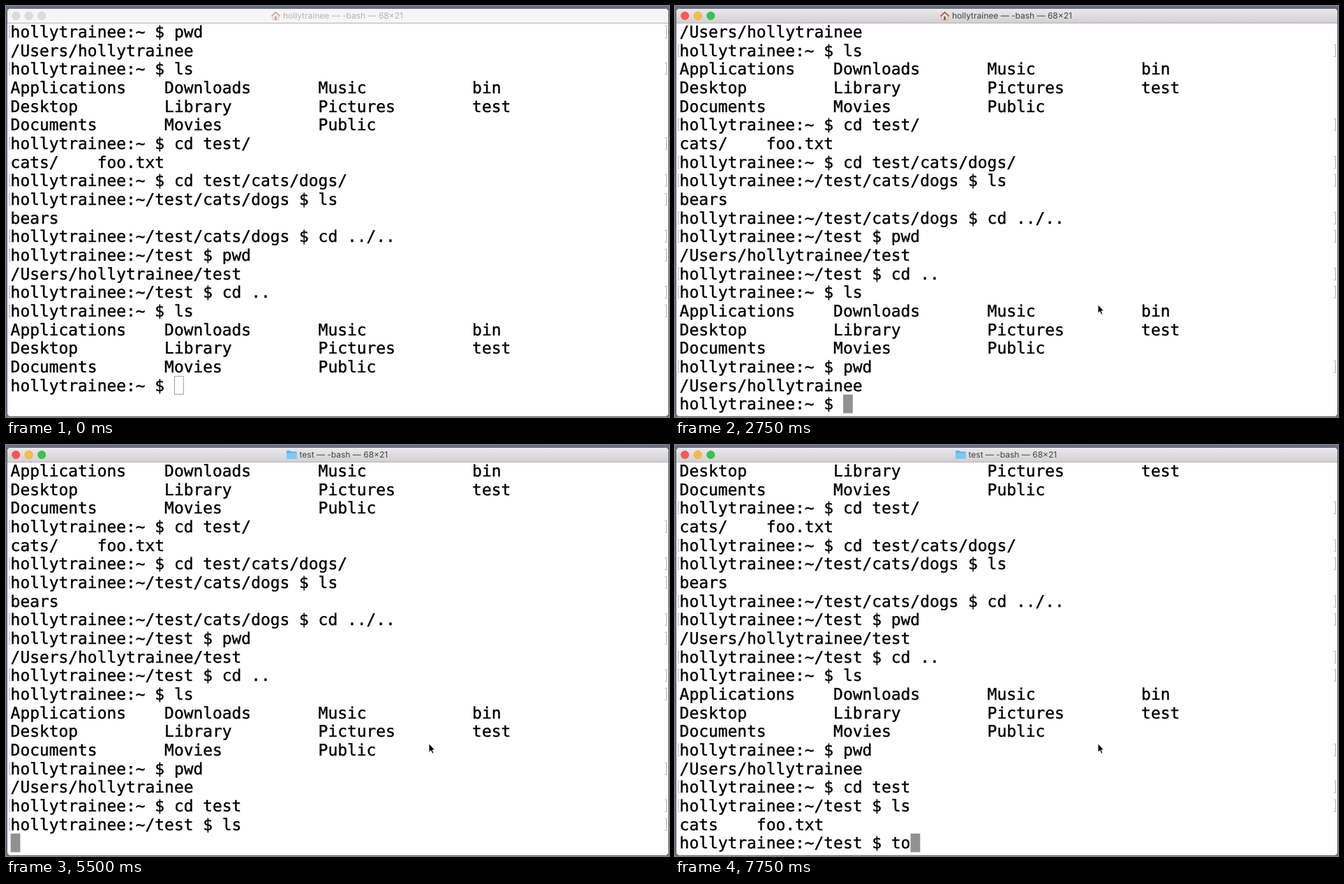
These frames come from a looping animation (950x589 px, 8000 ms). An HTML page:

```html
<!DOCTYPE html>
<html lang="en">
<head>
<meta charset="utf-8">
<title>Terminal</title>
<style>
  html, body { margin: 0; width: 100%; height: 100%; overflow: hidden; background: #667085; }
  svg { display: block; width: 950px; height: 589px; }
  text { white-space: pre; text-rendering: geometricPrecision; }
  #rows text { font: 22.9px "DejaVu Sans Mono", monospace; fill: #000; stroke: #000; stroke-width: .4px; }
  #rows path { fill: none; stroke: #b4b4b4; }
  #caption { font: 12px Inter, "Open Sans", sans-serif; fill: #444; }
  #bar { fill: url(#chrome); }
  #block { fill: #919191; }
  .idle #bar { fill: #f6f6f6; }
  .idle #lights circle { fill: #dcdcdc; stroke: #c9c9c9; }
  .idle #caption { fill: #b2b2b2; }
  .idle #icons { opacity: .5; }
  .idle #block { fill: #fff; stroke: #9c9c9c; }
</style>
</head>
<body>
<svg id="stage" viewBox="0 0 950 589">
  <defs>
    <linearGradient id="chrome" x2="0" y2="1">
      <stop stop-color="#ebe9eb"/>
      <stop offset="1" stop-color="#d2d0d2"/>
    </linearGradient>
  </defs>
  <rect width="950" height="589" fill="#667085"/>
  <rect x="1.5" y="3.5" width="948" height="585" rx="5" fill="#fff" stroke="#596273"/>
  <path id="bar" d="M2 24V9Q2 4 7 4H944Q949 4 949 9V24Z"/>
  <path d="M2 24.5H949" stroke="#b3b1b3"/>
  <g id="lights" stroke-width=".7">
    <circle cx="14.2" cy="14" r="5.6" fill="#fc5753" stroke="#df4744"/>
    <circle cx="32.7" cy="14" r="5.6" fill="#fdbc40" stroke="#de9f34"/>
    <circle cx="51.2" cy="14" r="5.6" fill="#33c748" stroke="#27aa35"/>
  </g>
  <g id="icons">
    <g id="house">
      <path d="M382 13.5L386.5 9.5L391 13.5V20H382Z" fill="#f1e6d6" stroke="#a89883" stroke-width=".8"/>
      <path d="M380.3 14.6L386.5 8.8L392.7 14.6" fill="none" stroke="#b5553c" stroke-width="1.6"/>
      <rect x="385" y="15" width="3" height="5" fill="#8a6544"/>
    </g>
    <g id="folder">
      <path d="M402 20V9Q402 8 403 8H407L408.5 9.5H415.5Q416.5 9.5 416.5 10.5V20Z" fill="#58b4e4"/>
      <path d="M402 11.5H416.5V20H402Z" fill="#78cbf3"/>
    </g>
  </g>
  <text id="caption" y="18.3"></text>
  <rect id="block"/>
  <g id="rows"></g>
  <path id="mouse" d="M1 1V13.4L3.8 10.8L5.9 15.3L7.9 14.4L5.9 10H9.6Z" stroke="#fff" stroke-width=".9"/>
</svg>
<script>
const LOOP = 8000, ROWS = 21;
const LEFT = 6.6, TOP = 23.5, BASE = 45, CHAR = 13.787, LINE = 80 / 3;
const USER = 'hollytrainee', HOME = '/Users/' + USER;
const $ = id => document.getElementById(id);

const prompt = (dir, cmd = '') => `${USER}:${dir} $ ${cmd}`;
const columns = (...names) => names.map(n => n.padEnd(16)).join('').trimEnd();
const listing = [
  columns('Applications', 'Downloads', 'Music', 'bin'),
  columns('Desktop', 'Library', 'Pictures', 'test'),
  columns('Documents', 'Movies', 'Public')
];
const log = [
  prompt('~', 'pwd'), HOME,
  prompt('~', 'ls'), ...listing,
  prompt('~', 'cd test/'), 'cats/    foo.txt',
  prompt('~', 'cd test/cats/dogs/'),
  prompt('~/test/cats/dogs', 'ls'), 'bears',
  prompt('~/test/cats/dogs', 'cd ../..'),
  prompt('~/test', 'pwd'), HOME + '/test',
  prompt('~/test', 'cd ..'),
  prompt('~', 'ls'), ...listing,
  prompt('~', 'pwd'), HOME,
  prompt('~', 'cd test'),
  prompt('~/test', 'ls'), 'cats    foo.txt'
];

// time, finished log lines, line being typed
const typing = [
  [0, 19, prompt('~')],
  [2000, 19, prompt('~', 'p')],
  [2500, 19, prompt('~', 'pw')],
  [2750, 21, prompt('~')],
  [3750, 21, prompt('~', 'cd')],
  [4000, 21, prompt('~', 'cd t')],
  [4250, 21, prompt('~', 'cd test')],
  [4500, 22, prompt('~/test')],
  [5500, 23, ''],
  [5750, 24, prompt('~/test')],
  [7750, 24, prompt('~/test', 'to')]
];

// time, x, y
const pointer = [
  [0, -50, -50], [250, 651, 205], [500, 385, 426],
  [750, 395, 444], [1000, 602, 434], [1250, 605, 427]
];

const at = (track, t) => track.findLast(step => step[0] <= t);

function set(el, attrs) {
  for (const key in attrs) el.setAttribute(key, attrs[key]);
  return el;
}

function add(tag, attrs) {
  const el = document.createElementNS($('stage').namespaceURI, tag);
  return $('rows').appendChild(set(el, attrs));
}

function drawRow(text, row, entered) {
  const y = BASE + Math.round(row * LINE);
  add('text', { x: LEFT, y }).textContent = text;
  if (!entered) return;
  const top = y - 16.5;
  add('path', { d: `M6.5 ${top}H4.5v17h2M944 ${top}h2.5v17h-2.5` });
}

function drawScreen([, count, live], idle) {
  const first = Math.max(0, count + 1 - ROWS);
  const last = count - first;
  $('rows').replaceChildren();
  log.slice(first, count).forEach((s, i) => drawRow(s, i, s.includes(' $ ')));
  drawRow(live, last, false);

  const edge = idle ? .5 : 0;
  set($('block'), {
    x: LEFT + live.length * CHAR + edge,
    y: TOP + last * LINE + edge,
    width: CHAR - 2 * edge,
    height: LINE - 2 * edge
  });

  const inTest = count >= 22;
  $('stage').classList.toggle('idle', idle);
  $('house').style.display = inTest ? 'none' : '';
  $('folder').style.display = inTest ? '' : 'none';
  $('caption').textContent = `${inTest ? 'test' : USER} — -bash — 68×21`;
  set($('caption'), { x: inTest ? 420.5 : 397 });
}

let shown = '';
function draw(now) {
  const t = now % LOOP, step = at(typing, t), idle = t < 750;
  const key = step[0] + ':' + idle;
  if (key !== shown) drawScreen(step, idle);
  shown = key;
  const [, x, y] = at(pointer, t);
  set($('mouse'), { transform: `translate(${x} ${y})` });
}

const start = performance.now();
function tick() {
  draw(performance.now() - start);
  requestAnimationFrame(tick);
}
tick();
</script>
</body>
</html>
```
